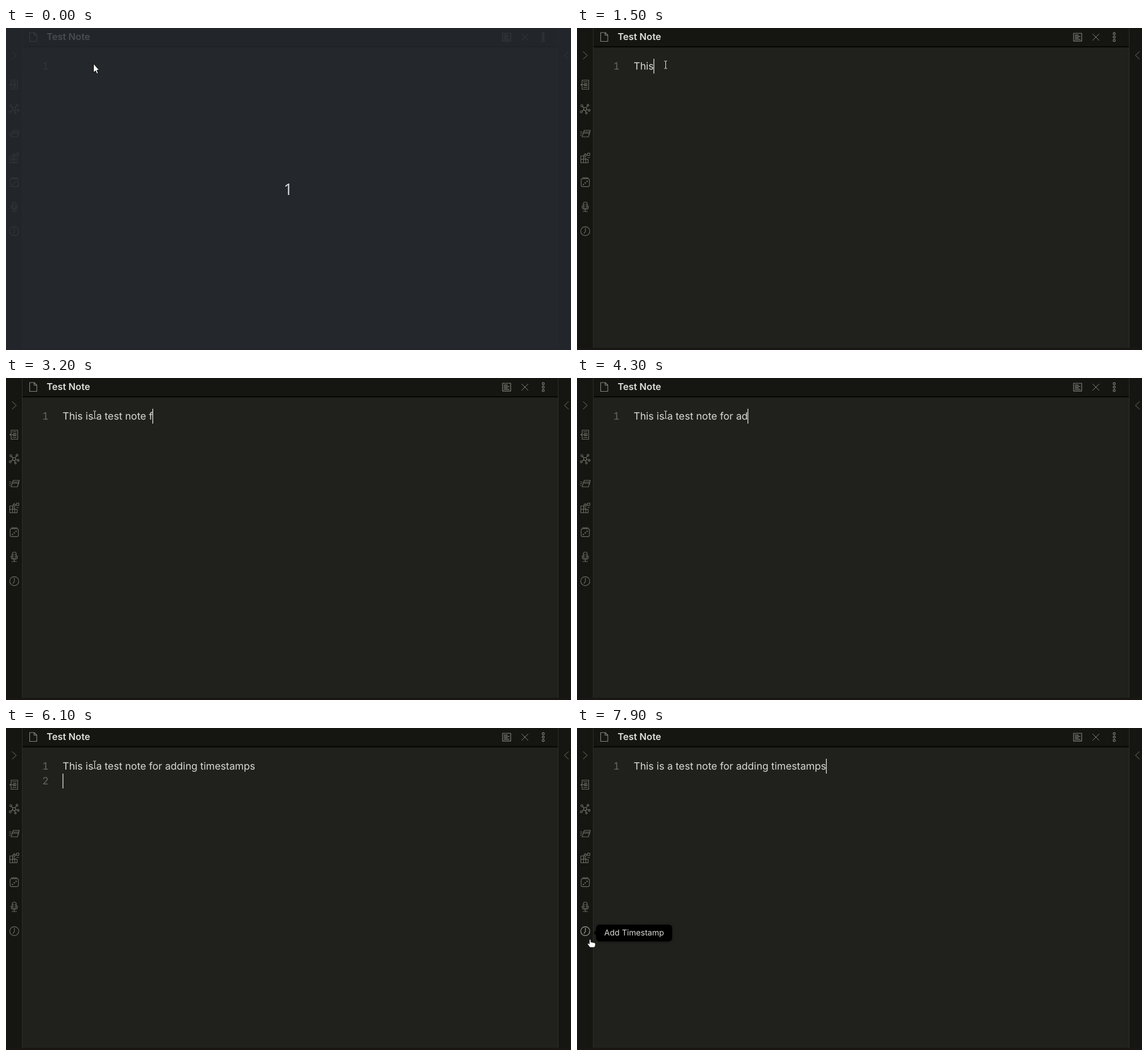
An HTML page for the animation above (8000 ms loop, 991 by 565 pixels).

```html
<!DOCTYPE html>
<html lang="en">
<head>
<meta charset="utf-8">
<title>Test Note</title>
<style>
  html, body { margin: 0; width: 100%; height: 100%; overflow: hidden; background: #151611; }
  svg { display: block; width: 991px; height: 565px; }
  text { font-family: Inter, sans-serif; white-space: pre; text-rendering: geometricPrecision; }
  .body { font-size: 17.64px; fill: #d9dad5; }
  .num { fill: #65665f; text-anchor: end; font-variant-numeric: tabular-nums; }
  .icon { fill: none; stroke: #6c6d66; stroke-width: 1.15; stroke-linecap: round; stroke-linejoin: round; }
  .bright { stroke: #84857f; }
  .dim { stroke: #4c4d47; }
  .dot { fill: #6c6d66; stroke: none; }
  #tip { filter: drop-shadow(0 1px 2px rgba(0, 0, 0, .3)); }
</style>
</head>
<body>
<svg viewBox="0 0 991 565">
  <rect width="991" height="565" fill="#151611"/>
  <rect x="29" y="34" width="939" height="527" fill="#20211c"/>
  <rect x="29" y="32" width="939" height="2" fill="#050504"/>
  <path d="M28.5 0V561M968.5 0V561" stroke="#2d2e29"/>
  <rect y="561" width="991" height="4" fill="#191613"/>

  <g class="icon">
    <path class="dim" d="M11 41.5L18 48L11 54.5M986.5 41.5L979.5 48L986.5 54.5"/>
    <!-- switcher -->
    <path d="M9 96V91.5H20.5V107.5H9V103M11.5 94.5H18M11.5 104.5H18M6.5 99.5H12M9.5 97L7 99.5L9.5 102M13 97.5H17.5V101.5H13ZM15 97.5V101.5"/>
    <!-- graph -->
    <path d="M12.5 140.5L9.5 137.5M16 140L18.5 136.5M17 143L20 144M12 143.5L8.5 146M15 145L16 148"/>
    <circle cx="14.3" cy="142.2" r="2.7"/>
    <circle cx="8.5" cy="136.3" r="1.8"/>
    <circle cx="19.3" cy="135.5" r="1.6"/>
    <circle cx="21.4" cy="144.5" r="1.6"/>
    <circle cx="7.5" cy="147" r="1.8"/>
    <circle cx="16.5" cy="149.3" r="1.5"/>
    <!-- cards -->
    <path d="M11.5 182.5H22.5L20 191H9ZM12 182L12.7 179.5H23.3L21.5 187M6 182.5H9M6 185.5H8.5M6 188.5H7.5M12 184.7H21"/>
    <!-- blocks -->
    <path d="M6.7 224.5H11.5V236.5H6.7ZM6.7 230.5H19.5V236.5H11.5M15.5 228V236.5M11.5 228H15.5"/>
    <path d="M14.5 220.5L17 223L14.5 225.5L12 223ZM18.5 219.5H22.5V223.5H18.5ZM18.7 227H22"/>
    <!-- dice -->
    <rect x="7.3" y="264.5" width="14.4" height="13.8" rx="2.2"/>
    <path d="M9.5 262.8H19.5"/>
    <g class="dot"><circle cx="17.7" cy="269" r="1.2"/><circle cx="14.5" cy="271.8" r="1.2"/><circle cx="11.3" cy="274.6" r="1.2"/></g>
    <!-- microphone -->
    <rect x="11" y="305.5" width="7" height="11" rx="3.4"/>
    <path d="M9 312V314Q9 318.3 14.5 318.3T20 314V312M14.5 318.5V321.5M10.5 322H18.5M11.5 309.5H13.5M15.5 309.5H17.5M11.5 312.5H13.5M15.5 312.5H17.5"/>
  </g>
  <g class="icon" id="clock">
    <circle cx="14.5" cy="356.5" r="7.9"/>
    <path d="M14.7 351V357L12.4 360.3"/>
  </g>
  <g class="icon bright">
    <path d="M41.5 8H49.5L54 12.5V23.5H41.5ZM49.3 8.2V12.7H53.8"/>
    <path d="M871 9.2H885.2V22.8H871ZM873.5 12.3H879.5M873.5 14.8H882.5M873.5 17.3H879.5M873.5 19.8H882.5"/>
    <path d="M904.5 10.5L915.7 21.7M915.7 10.5L904.5 21.7" stroke-width="1"/>
    <circle cx="942.3" cy="10" r="1.9"/><circle cx="942.3" cy="16" r="1.9"/><circle cx="942.3" cy="22" r="1.9"/>
  </g>

  <text x="71.2" y="21.3" font-size="16.5" font-weight="600" fill="#dfe0dc">Test Note</text>
  <text class="body num" x="75" y="73.2">1</text>
  <text class="body num" x="75" y="99.3" id="second">2</text>
  <text class="body" x="99.3" y="73.2" id="typed"></text>
  <path id="wave" fill="none" stroke="#a3182c" stroke-width="1"/>
  <rect id="caret" width="1.2" fill="#f4f4f0"/>

  <g id="tip">
    <path d="M29.5 359.5L34 355V364Z"/>
    <rect x="33.5" y="345" width="133.5" height="29.6" rx="6"/>
    <text x="47.7" y="364.3" font-size="14.1" fill="#d9dad5">Add Timestamp</text>
  </g>

  <g id="overlay">
    <rect width="991" height="565" fill="#25292f" fill-opacity=".81"/>
    <text x="495" y="293" font-size="28" fill="#dcdddf" text-anchor="middle" style="font-family:'Open Sans',sans-serif">1</text>
    <path d="M153.5 62.5V78.3L157 75L159.3 80.3L161.7 79.2L159.4 74H163.6Z" fill="#fff" stroke="#0a0a0a" stroke-width="1"/>
  </g>
  <path id="beam" d="M-2.5 -6.5H-.7L0 -6L.7 -6.5H2.5M0 -6V6M-2.5 6.5H-.7L0 6L.7 6.5H2.5" fill="none" stroke="#f0f0ee" stroke-width="1"/>
  <path id="hand" d="M22.2 371Q23.8 370.3 24.2 372V375.5L31.2 377Q32.2 377.5 32.2 379V381.5L30.7 385H22.7L18.7 379.5Q18.2 377.8 19.7 377.7L21.7 379V372Z" fill="#fff" stroke="#0a0a0a" stroke-width=".8"/>
</svg>
<script>
const LOOP = 8000, LEFT = 99.3, LINE = 26;
const NOTE = 'This is a test note for adding timestamps';
const $ = id => document.getElementById(id);
const pen = document.createElement('canvas').getContext('2d');

// Runs of typing: start time, then the note length at each 100 ms tick.
const runs = [
  [1000, 1], [1300, 2], [1500, 4, 5, 6], [1900, 7, 8, 10],
  [2300, 11, 12, 13, 14], [2800, 16, 17, 19], [3200, 21], [3500, 22],
  [4000, 23, 24, 25, 26, 27, 29, 30, 32, 33], [4900, 35],
  [5100, 37, 38, 39, 40, 41]
];
const caretOff = [[900, 1000], [3800, 4000], [7000, 7600]];
const misspelt = [[3500, 4000, 20], [5100, 5400, 31]];

const within = (t, [a, b]) => t >= a && t < b;
const show = (id, on) => $(id).setAttribute('display', on ? 'inline' : 'none');

function lengthAt(t) {
  const run = runs.filter(r => r[0] <= t).pop();
  if (!run) return 0;
  const step = Math.floor((t - run[0]) / 100) + 1;
  return run[Math.min(step, run.length - 1)];
}

function edge(n) {
  pen.font = '17.64px Inter, sans-serif';
  return LEFT + pen.measureText(NOTE.slice(0, n)).width;
}

function wavePath(x, end) {
  let d = `M${x} 75.5`;
  for (let i = 1; x + i * 2 <= end; i++) d += `L${x + i * 2} ${i % 2 ? 74.3 : 75.7}`;
  return d;
}

function placeCaret(x, y, h) {
  const c = $('caret');
  c.setAttribute('x', x);
  c.setAttribute('y', y);
  c.setAttribute('height', h);
}

function draw(t) {
  const n = lengthAt(t);
  const newLine = within(t, [6100, 6500]);
  $('typed').textContent = NOTE.slice(0, n);
  show('second', newLine);

  const bad = misspelt.find(m => within(t, m));
  show('wave', bad);
  if (bad) $('wave').setAttribute('d', wavePath(edge(bad[2]), edge(n)));

  if (t < 400) placeCaret(148.2, 6, 19.5);
  else if (newLine) placeCaret(LEFT, 54 + LINE, LINE);
  else placeCaret(edge(n) - (n ? 0.4 : 0), 54, LINE);
  show('caret', t >= 300 && !caretOff.some(o => within(t, o)));

  const [bx, by] = t < 7100 ? [155.5, 64.5] : t < 7200 ? [130.5, 88.5] : [79.5, 139.5];
  $('beam').setAttribute('transform', `translate(${bx} ${by})`);
  show('beam', within(t, [300, 7300]));

  show('overlay', t < 300);
  show('hand', t >= 7800);
  show('tip', t >= 7900);
  $('clock').style.stroke = t >= 7800 ? '#a4a59f' : '';
}

function tick(now) {
  draw(now % LOOP);
  requestAnimationFrame(tick);
}
requestAnimationFrame(tick);
</script>
</body>
</html>
```
